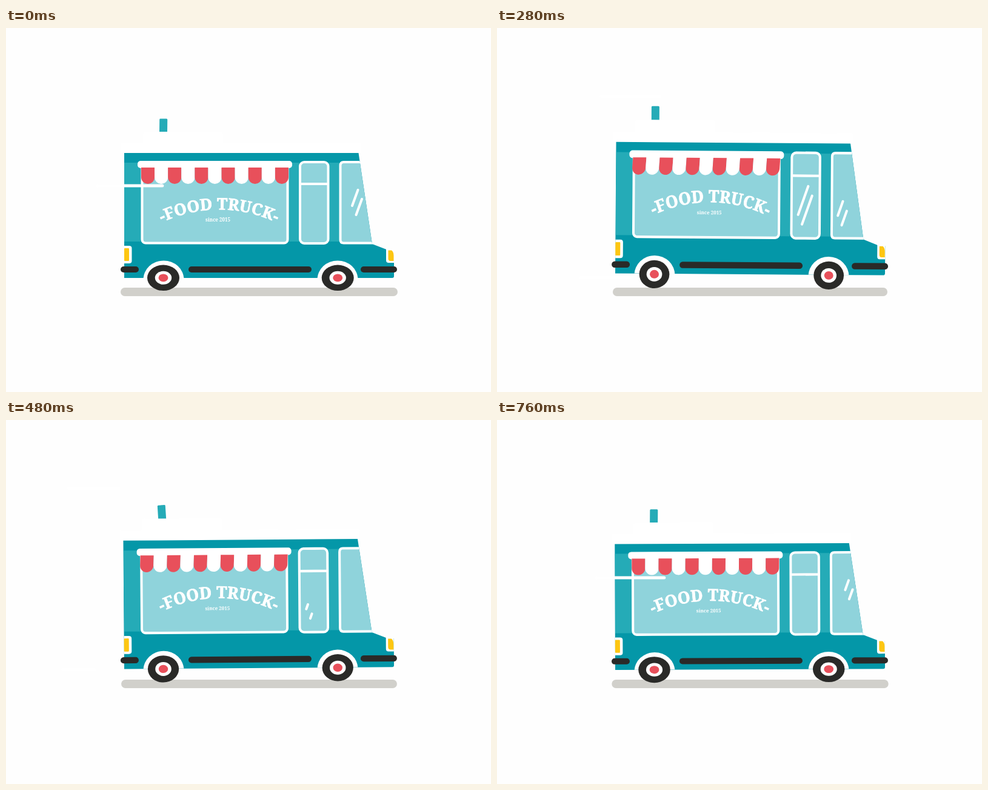
These frames come from a looping animation (800 px wide and 600 px high, 0.8 s). An HTML page:

```html
<!DOCTYPE html>
<html lang="en">
<head>
<meta charset="utf-8">
<title>Food truck</title>
<style>
html, body { margin: 0; width: 100%; height: 100%; overflow: hidden; background: #fefefe; }
svg { display: block; width: 100vw; height: 100vh; }
text { font-family: "Noto Serif", serif; font-weight: 700; fill: #fff; text-anchor: middle; }
.title { font-size: 26.5px; stroke: #fff; stroke-width: .8; }
.glass { fill: #8fd3db; stroke: #fff; stroke-width: 4; }
.line { fill: none; stroke: #fff; stroke-width: 4; stroke-linecap: round; }
.gust { stroke-width: 5; }
.dark { fill: #2a2a28; }
.light { fill: #fdc612; }
.white { fill: #fff; }
</style>
</head>
<body>
<svg viewBox="0 0 800 600">
  <defs>
    <path id="shell" d="M195 206H581.5L604 356 630 366H640V409Q640 412 637 412H195Z"/>
    <path id="arc" d="M231.5 335A220 220 0 0 1 471.5 335"/>
    <clipPath id="shellClip"><use href="#shell"/></clipPath>
    <g id="tyre">
      <circle class="dark" r="26.5"/><circle class="white" r="13.7"/><circle fill="#e8505b" r="8"/>
    </g>
  </defs>
  <rect id="shadow" y="428" height="14" rx="7" fill="#d1d0cb"/>
  <g id="tilt">
    <g id="body">
      <rect id="pipe" x="253" y="149.500" width="13" height="24" rx="1.5" fill="#25abb7"/>
      <path class="white" d="M226 190V176Q226 171 231 171H353Q358 171 358 176V190H585V206H190V190Z"/>
      <use href="#shell" fill="#0497a8"/>
      <g clip-path="url(#shellClip)">
        <rect x="195" y="222" width="362" height="130" fill="#25abb7"/>
        <path class="glass" d="M620 221H557Q551.5 221 551.5 227V349Q551.5 354.5 557 354.5H620"/>
        <ellipse class="white" cx="260" cy="414.5" rx="33.5" ry="31"/>
        <ellipse class="white" cx="547" cy="414.5" rx="33.5" ry="31"/>
      </g>
      <rect class="glass" x="224.5" y="224" width="240" height="130.5" rx="6"/>
      <rect class="glass" x="485" y="221" width="46.5" height="134" rx="7"/>
      <path class="line" d="M486 257H530"/>
      <rect class="white" x="217" y="219" width="255" height="12" rx="5"/>
      <g id="awning"></g>
      <text class="title"><textPath href="#arc" startOffset="50%">-FOOD TRUCK-</textPath></text>
      <text x="349.5" y="318.5" font-size="8">since 2015</text>
      <path class="white" d="M195 359H203Q207.5 359 207.5 363V384Q207.5 388 203 388H195Z"/>
      <rect class="light" x="195" y="363" width="8" height="21" rx="1"/>
      <path class="white" d="M627 363L640 366V387H631Q627 387 627 383Z"/>
      <path class="light" d="M630.5 366.5H636Q639.5 369 639.5 375V384H634Q630.5 384 630.5 380Z"/>
      <g class="dark">
        <rect x="189" y="393" width="30" height="10" rx="5"/>
        <rect x="301" y="393" width="203" height="10" rx="5"/>
        <rect x="585" y="393" width="60" height="10" rx="5"/>
      </g>
      <path id="doorGlint" class="line"/>
      <path id="screenGlint" class="line"/>
    </g>
    <use id="rearWheel" href="#tyre"/>
    <use id="frontWheel" href="#tyre"/>
  </g>
  <path id="highGust" class="line gust"/>
  <path id="midGust" class="line gust"/>
  <path id="lowGust" class="line gust"/>
</svg>
<script>
const LOOP = 800, STEP = 40;
const { sin, cos, min, max, PI } = Math;
const set = (id, attrs) => {
  for (const k in attrs) document.getElementById(id).setAttribute(k, attrs[k]);
};

const ramp = (t, from, to) => min(1, max(0, (t - from) / (to - from)));
const easeOut = p => 1 - (1 - p) ** 2;
const smooth = p => p * p * (3 - 2 * p);
const since = (t, begin) => (t - begin + LOOP) % LOOP;

// Red and white scallops below the awning bar.
const STRIPES = 11, W = 243 / STRIPES;
document.getElementById("awning").innerHTML = Array.from({ length: STRIPES }, (_, i) =>
  `<path class="stripe" fill="${i % 2 ? "#fff" : "#e8505b"}"
    d="M${223 + i * W} 230v16a${W / 2} 11 0 0 0 ${W} 0v-16z"/>`).join("");
const stripes = document.querySelectorAll(".stripe");

// Two parallel reflections: the head runs down the pane, then the tail follows.
function glint(id, age, x, y) {
  const head = ramp(age, 0, 200), tail = ramp(age, 220, 500);
  const at = (p, k) => `${x - 19 * p + 6.5 * k} ${y + 52 * p + 15 * k}`;
  const stroke = k => `M${at(tail, k)}L${at(head, k)}`;
  set(id, { d: head - tail < .01 ? "" : stroke(0) + stroke(1) });
}

// A streak of wind blown left from one point to another.
function gust(id, age, y, from, to) {
  const at = p => from + (to - from) * p;
  const left = at(easeOut(ramp(age, 0, 460))) + 2.5;
  const right = at(smooth(ramp(age, 140, 600))) - 2.5;
  set(id, { d: right > left ? `M${left} ${y}H${right}` : "" });
}

function draw(now) {
  const t = Math.floor(now % LOOP / STEP) * STEP;
  const a = t / LOOP * 2 * PI;
  const k = (1 - cos(2 * a)) / 2; // two bounces per loop
  const lift = 25.5 * k;
  const tilt = .63 * sin(a) - .16 * k;
  const lean = sin(a) + 2.7 * cos(a) - 2 * cos(2 * a);

  set("shadow", { x: 189 + 3 * k, width: 457 - 6 * k });
  set("tilt", { transform: `rotate(${tilt} 417 405)` });
  set("body", { transform: `matrix(1 0 0 ${1 + .64 * lift / 206} 0 ${-1.64 * lift})` });
  set("pipe", { transform: `rotate(${lean} 259.5 172)` });
  for (const s of stripes) {
    s.setAttribute("transform", `translate(0 230) skewX(${-6 * k}) translate(0 -230)`);
  }

  const squash = `scale(${1 - .094 * k} ${.8 + .11 * k})`;
  const axle = 411.8 - .29 * lift;
  set("rearWheel", { transform: `translate(259.5 ${axle}) ${squash}` });
  set("frontWheel", { transform: `translate(547.2 ${axle}) ${squash}` });

  glint("doorGlint", since(t, 20), 515, 266);
  glint("screenGlint", since(t, 700), 580.5, 267);
  gust("highGust", since(t, 120), 112.5, 272, 93);
  gust("midGust", since(t, 520), 260, 300, 121);
  gust("lowGust", since(t, 90), 411.5, 225, 88);
}

const start = performance.now();
(function frame() {
  draw(performance.now() - start);
  requestAnimationFrame(frame);
})();
</script>
</body>
</html>
```
